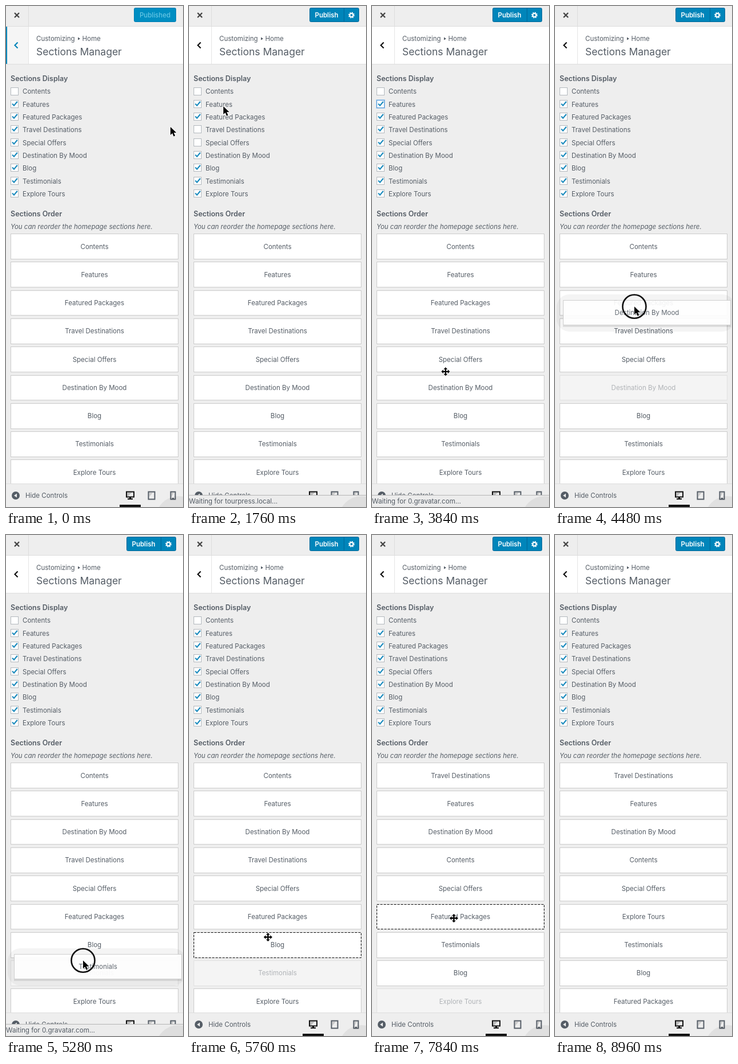
An HTML page that plays this animation: 310x874 px, repeating every 9120 ms.

```html
<!DOCTYPE html>
<html lang="en">
<head>
<meta charset="utf-8">
<title>Sections Manager</title>
<style>
html, body { margin: 0; width: 100%; height: 100%; overflow: hidden; background: #eee; }
svg { display: block; width: 310px; height: 874px; font: 11.5px Inter, sans-serif; }
</style>
</head>
<body>
<svg id="stage" viewBox="0 0 310 874"></svg>
<script>
const LOOP = 9120, STEP = 160, INK = '#555d66', BLUE = '#0085ba';
const names = ['Contents', 'Features', 'Featured Packages', 'Travel Destinations', 'Special Offers',
  'Destination By Mood', 'Blog', 'Testimonials', 'Explore Tours'];

const ROW = 22.3, SLOT = 49.28;
const slotTop = i => Math.round(397.1 + SLOT * i);
const slotHeight = i => Math.round(441.85 + SLOT * i) - slotTop(i);
const slotMiddle = i => Math.floor(420 + SLOT * i);

// Three rows are switched off, then on again; afterwards four pairs of slots are swapped
const clicks = [3, 4, 1, 3, 4, 1].map((row, i) => ({ at: 880 + 500 * i, row }));
const drags = [[5, 2], [7, 6], [3, 0], [8, 5]].map(([from, to], i) => {
  const press = 3960 + 1060 * i, release = press + 600;
  return { from, to, press, release, done: release + STEP };
});
const changes = [...clicks.map(c => c.at), ...drags.map(d => d.done)];

const path = [
  { t: 0, x: 288, y: 211 },
  ...clicks.map(c => ({ t: c.at, x: 15, y: 149 + ROW * c.row, bow: 66 })),
  ...drags.flatMap(d => [
    { t: d.press, x: 133, y: slotMiddle(d.from) - 11 },
    { t: d.release, x: 139, y: slotMiddle(d.to) + 5 }]),
  { t: 8300, x: 330, y: 560 },
  { t: LOOP, x: 330, y: 560 }
];

const ease = k => k < .5 ? 4 * k ** 3 : 1 - 4 * (1 - k) ** 3;

function pointerAt(t) {
  const i = path.findIndex(p => p.t > t), a = path[i - 1], b = path[i];
  const k = (t - a.t) / (b.t - a.t), e = ease(k);
  const bow = Math.min(b.bow || 0, Math.abs(b.y - a.y)) * Math.sin(Math.PI * k);
  return [a.x + (b.x - a.x) * e + bow, a.y + (b.y - a.y) * e];
}

const rect = (x, y, w, h, fill, extra = '') =>
  `<rect x="${x}" y="${y}" width="${w}" height="${h}" fill="${fill}" ${extra}/>`;
const box = (x, y, w, h, fill, stroke, extra = '') =>
  rect(x + .5, y + .5, w - 1, h - 1, fill, `stroke="${stroke}" ${extra}`);
const text = (x, y, s, extra = '', fill = INK) => `<text x="${x}" y="${y}" fill="${fill}" ${extra}>${s}</text>`;
const centred = (x, y, s, extra = '', fill = INK) => text(x, y, s, 'text-anchor="middle" ' + extra, fill);
const heading = (y, s) => text(8, y, s, 'font-size="12.5" font-weight="600"');
const line = (d, stroke, width) => `<path d="${d}" fill="none" stroke="${stroke}" stroke-width="${width}"/>`;
const shape = (d, fill, extra = '') => `<path d="${d}" fill="${fill}" ${extra}/>`;
const group = (x, y, body) => `<g transform="translate(${x} ${y})">${body}</g>`;

function header(fresh) {
  const button = fresh
    ? box(224, 3, 74, 25, '#008ec2', '#007cb2', 'rx="2"') + centred(261, 20, 'Published', 'font-weight="500"', '#66c6e4')
    : box(211, 3, 87, 25, BLUE, '#006799', 'rx="2"') + rect(271, 3, 1, 25, '#006799') +
      centred(241, 20, 'Publish', 'font-weight="600"', '#fff') +
      group(284.5, 16, `<g fill="none" stroke="#fff" stroke-width="2"><circle r="3"/>
        <circle r="4.5" stroke-dasharray="1.8 1.734"/></g>`);
  return rect(0, 35, 310, 1, '#ddd') + rect(39, 0, 1, 35, '#ddd') +
    line('M15 12l8 8m0-8l-8 8', '#444', 2.3) + button +
    rect(0, 36, 310, 65, '#fff') + rect(0, 101, 310, 1, '#ddd') + rect(39, 36, 1, 65, '#e4e4e4') +
    (fresh ? rect(0, 36, 39, 65, '#f5f5f5') + rect(0, 36, 2, 65, BLUE) : '') +
    line('M20.5 63.5l-5 5 5 5', fresh ? BLUE : '#111', 2.2) +
    text(53, 61, 'Customizing') + shape('M126 54.5l4 2.5-4 2.5z', INK) + text(133.5, 61, 'Home') +
    text(53, 86, 'Sections Manager', 'font-size="17.5"');
}

function checkboxes(t) {
  const past = clicks.filter(c => c.at <= t), last = past.at(-1);
  return names.map((name, i) => {
    const on = i > 0 && past.filter(c => c.row === i).length % 2 === 0;
    const lit = on && last && last.row === i && t - last.at < 600;
    const y = Math.floor(142 + ROW * i);
    return (lit ? rect(7, y - 1, 16, 16, '#a9cdec') : '') +
      box(8, y, 14, 14, '#fff', lit ? '#5b9dd9' : '#b4b9be') +
      (on ? line(`M11 ${y + 6.5}l3 3.2 5.8-7`, '#1e8cbe', 2.2) : '') +
      text(29, Math.ceil(153 + ROW * i), name);
  }).join('');
}

function sections(t, y) {
  const order = [...names];
  for (const { from, to, done } of drags) if (t >= done) [order[from], order[to]] = [order[to], order[from]];
  const drag = drags.find(d => t >= d.press && t < d.done), dropping = drag && t >= drag.release;
  const items = order.map((name, i) => {
    const target = dropping && i === drag.to;
    return `<g opacity="${drag && i === drag.from ? .4 : 1}">` +
      box(8, slotTop(i), 294, slotHeight(i), '#fff', target ? '#000' : '#ccc', target ? 'stroke-dasharray="4 2"' : '') +
      centred(155, slotMiddle(i) + 4, name) + '</g>';
  }).join('');
  if (!drag || dropping) return items;
  const lift = Math.round(y - slotMiddle(drag.from) + 11);
  return items + group(6, slotTop(drag.from) + lift,
    rect(-3, -10, 312, 65, '#000', 'rx="22" opacity=".045"') +
    `<g opacity=".92">${rect(8, 3, 294, 44, '#000', 'opacity=".1"')}` +
    box(8, 0, 294, 44, '#fff', '#ccc') + centred(155, 26, order[drag.from]) + '</g>');
}

// The bubble follows each change for a while, the page first and its images later
function status(t) {
  const age = Math.min(...changes.filter(c => c <= t).map(c => t - c));
  if (age >= 800) return '';
  const host = age < 400 ? 'tourpress.local' : '0.gravatar.com';
  return rect(0, 853, 310, 21, '#ececec') + rect(0, 853, 310, 1, '#b5b5b5') +
    text(0, 868, `Waiting for ${host}...`, 'font-size="11.7"');
}

function footer(t) {
  return rect(0, 833, 310, 41, '#eee') + rect(0, 833, 310, 1, '#ddd') +
    `<circle cx="17" cy="854" r="7" fill="${INK}"/>` + shape('M19 850.5v7l-5-3.5z', '#eee') +
    text(34, 858, 'Hide Controls') +
    box(210.5, 847, 14, 10, 'none', '#111', 'stroke-width="2"') +
    shape('M216 857h3v2h3v2h-9v-2h3z', '#111') + shape('M212 849h8l-6 6h-2z', '#bbb') +
    box(249, 847, 12, 14, 'none', INK, 'stroke-width="2"') + shape('M251 849h6l-6 7z', '#ccc') +
    box(288, 847, 9, 14, 'none', INK, 'stroke-width="2"') + shape('M290 849h4l-4 7z', '#ccc') +
    rect(291, 858, 3, 2, INK) + rect(199, 870, 37, 4, '#111') + status(t) +
    '<circle cx="302" cy="895" r="40" opacity=".06"/>';
}

function pointer(t, x, y) {
  const dragging = drags.some(d => t >= d.press && t < d.release);
  const pressed = dragging || clicks.some(c => t >= c.at && t < c.at + STEP);
  const outline = 'stroke="#fff" stroke-width="1.2" paint-order="stroke"';
  const arms = [0, 90, 180, 270].map(a => shape('M-1 0v-4h-2.5l3.5-3.5 3.5 3.5h-2.5v4z', '#000', `transform="rotate(${a})"`)).join('');
  const icon = y > 397 && !dragging
    ? `<g ${outline}>${arms}</g>` + rect(-1, -4, 2, 8, '#000') + rect(-4, -1, 8, 2, '#000')
    : shape('M0 0v14l3.3-3.1 2.4 5.5 2.5-1.1-2.4-5.3h4.5z', '#000', outline);
  return group(x, y, icon + (pressed ? '<circle r="20.5" fill="none" stroke="#111" stroke-width="2.6"/>' : ''));
}

const stage = document.getElementById('stage');
let shown = -1;

function draw(now) {
  const t = Math.floor(now % LOOP / STEP) * STEP;
  if (t !== shown) {
    shown = t;
    const [x, y] = pointerAt(t);
    stage.innerHTML = rect(0, 0, 310, 874, '#eee') + header(t < clicks[0].at) +
      heading(131, 'Sections Display') + checkboxes(t) + heading(367, 'Sections Order') +
      text(8, 389, 'You can reorder the homepage sections here.', 'font-style="italic"') +
      sections(t, y) + footer(t) + pointer(t, x, y);
  }
  requestAnimationFrame(draw);
}
draw(performance.now());
</script>
</body>
</html>
```
